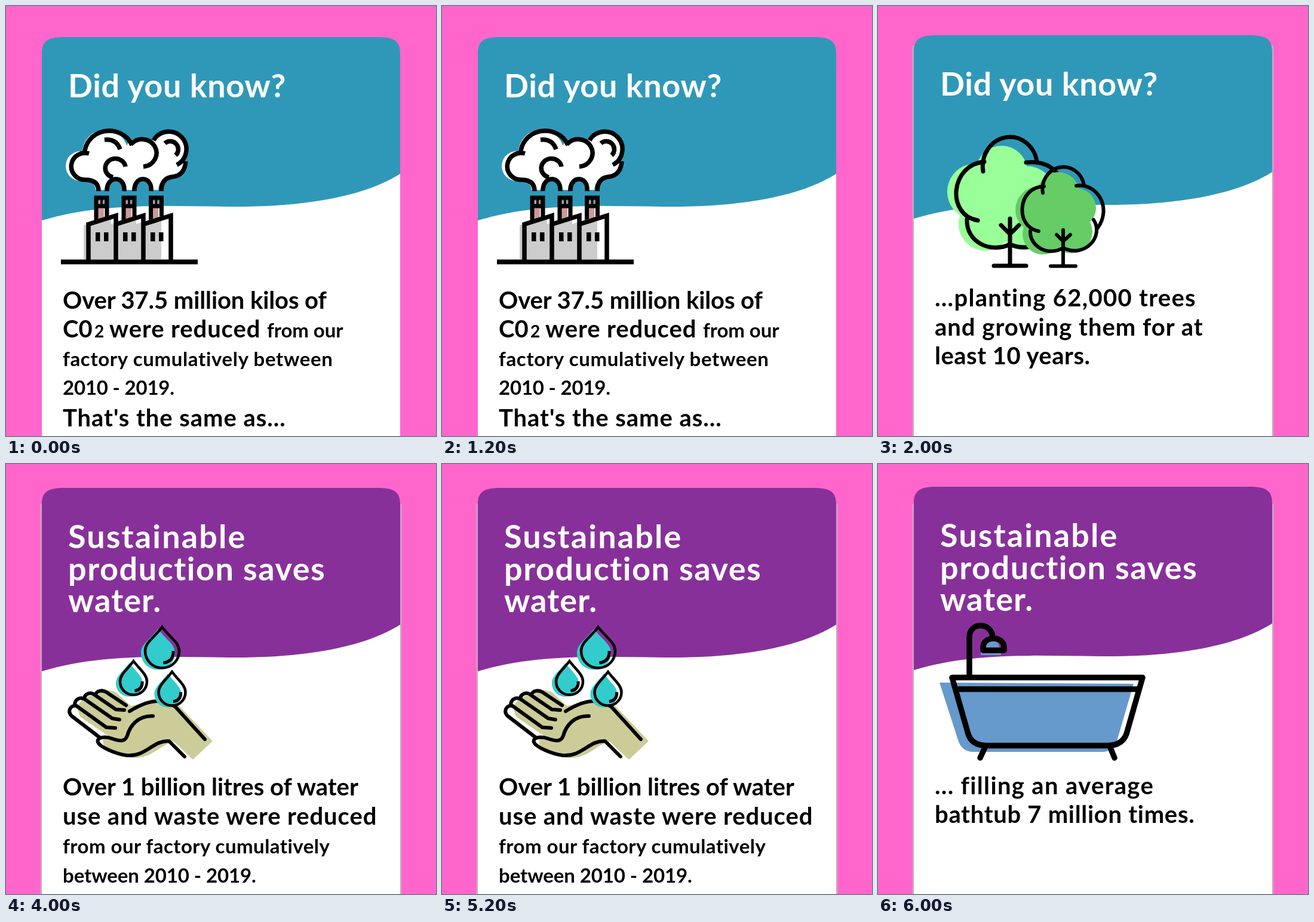
Recreate the animation shown at these times as an HTML page. Size 720x720 px, loop 8000 ms.

```html
<!DOCTYPE html>
<html lang="en">
<head>
<meta charset="utf-8">
<title>Did you know?</title>
<style>
html, body { margin: 0; width: 100%; height: 100%; overflow: hidden; background: #ff66cc; }
svg { display: block; width: 100vw; height: 100vh; }
text { font-family: Lato, "Open Sans", sans-serif; font-weight: 700; }
.line { fill: none; stroke: #000; }
.round { stroke-linecap: round; stroke-linejoin: round; }
</style>
</head>
<body>
<svg id="stage" viewBox="0 0 720 720" xmlns="http://www.w3.org/2000/svg"></svg>
<script>
const TEAL = "#2f98b8", PURPLE = "#88309a";
const SCENE_MS = 2000;

const fill = (d, color) => `<path d="${d}" fill="${color}"/>`;
const line = (d, width, cls = "") => `<path class="line ${cls}" d="${d}" stroke-width="${width}"/>`;
const disc = (x, y, r) => `<circle cx="${x}" cy="${y}" r="${r}"/>`;
const discs = (color, list) => `<g fill="${color}">${list.map(c => disc(...c)).join("")}</g>`;
const text = (x, y, size, gap, words, color = "#000") =>
  `<text x="${x}" y="${y}" font-size="${size}" letter-spacing="${gap}" fill="${color}">${words}</text>`;
const title = (y, gap, words) => text(104, y, 54, gap, words, "#fff");
const big = (y, gap, words, x = 95) => text(x, y, 40, gap, words);
const small = (y, gap, words, x = 95) => text(x, y, 33, gap, words);

function card(dy, color, edges) {
  const rim = edges ? '<rect x="57.5" y="66" width="605" height="660" rx="3" fill="#cfa3c0"/>' : "";
  const wave = "C160 329 260 335 372 336 C500 337 600 319 660 281";
  return rim + '<rect x="60" y="78" width="600" height="650" fill="#fff"/>' +
    `<g transform="translate(0 ${dy})">` +
    fill(`M60 359 ${wave} V80 C660 58 650 52 620 52 H100 C70 52 60 58 60 80Z`, color) + "</g>";
}

function factory() {
  const bays = [138, 184, 230];
  const smoke = discs("#fff", [[125, 268, 25], [166, 245, 38], [225, 246, 26], [270, 238, 30], [278, 267, 20]]) +
    fill("M122 250 H284 V284 Q256 286 255 308 H240 Q238 290 225 291 Q212 291 211 308 H196 Q194 290 183 290 Q168 290 165 308 H150 Q150 292 122 292Z", "#fff");
  const outline = line(
    "M139 247 A23 22.5 0 1 0 133 291 Q155 291 155 310" +
    "M132 250 A41 38 0 0 1 211 233 M165 224 Q185 222 191 240" +
    "M209 232 A24 23 0 1 1 230 269 M247 225 A29.5 29.5 0 1 1 286 266" +
    "M266 230 A13 13 0 1 1 284 250 M301 260 Q299 284 279 286 Q260 288 260 310" +
    "M200 269 A17 16 0 1 0 179 287" +
    "M169 310 C168 283 200 283 198 310 M215 310 C214 283 245 283 243 310", 7.5);
  const chimneys = [160, 206, 251.5].map(x =>
    `<rect x="${x - 12}" y="326" width="16" height="42" fill="#cc9999"/>` +
    line(`M${x - 9} 360 V321 H${x + 9} V354 M${x - 9} 335 H${x + 9}`, 7) +
    line(`M${x} 321 V334`, 4)).join("");
  const walls = fill("M130 424 V367 L176 353 V365 L218 352 V365 L260 352 V424Z", "#cccccc");
  const frames = line(bays.map(x => `M${x} 426 V365.5 L${x + 46} 351 V426`).join(""), 7.5);
  const panes = bays.map(x => `<path d="M${x + 12} 379h7.5v15h-7.5z m14 0h7.5v15h-7.5z"/>`).join("");
  return smoke + outline + chimneys + walls + frames + panes + line("M92 428.5 H321", 8);
}

function trees() {
  const back = discs("#99ff99", [[207, 277, 43], [163, 311, 47], [180, 365, 45], [249, 315, 47], [243, 371, 38], [210, 330, 50]]);
  const front = discs("#66cc66", [[302, 313, 35], [269, 341, 39], [276, 382, 34], [332, 338, 33], [323, 378, 36], [300, 350, 40]]);
  const backLines = line(
    "M176 277 A45.5 49 0 0 1 266 260 M248 262 Q282 259 299 279" +
    "M178 261 C122 265 113 349 167 359 M149 357 C147 395 188 415 221 399 Q236 406 256 403" +
    "M221 356 V435 M206 367 L221 382 L236 367 M194 435 H248", 7, "round");
  const frontLines = line(
    "M276 313 A35 37 0 0 1 345 300 M332 301 C367 296 393 338 367 373" +
    "M361 358 C379 386 346 423 310 405 M278 302 C233 303 229 370 269 377" +
    "M255 377 C254 403 285 420 310 405" +
    "M310 375 V435 M299 383 L310 394 L322 383 M289 435.5 H331", 6, "round");
  return back + backLines + front + frontLines;
}

function drop(x, tip, cy, r) {
  const k = r * 0.56, low = cy + r;
  const shape = `M${x} ${tip} C${x + r * 0.5} ${tip + r * 0.66} ${x + r} ${cy - r * 0.5} ${x + r} ${cy}` +
    `C${x + r} ${cy + k} ${x + k} ${low} ${x} ${low} S${x - r} ${cy + k} ${x - r} ${cy}` +
    `C${x - r} ${cy - r * 0.5} ${x - r * 0.5} ${tip + r * 0.66} ${x} ${tip}Z`;
  const glint = `M${x + r * 0.65} ${cy} Q${x + r * 0.68} ${cy + r * 0.62} ${x + 2} ${cy + r * 0.7}`;
  return `<g transform="translate(-7 3)">${fill(shape, "#33cccc")}</g>` + line(shape, 4.5) + line(glint, 5);
}

function hand() {
  const skin = fill("M119 408 C124 394 138 386 151 387 C157 376 173 377 184 382 L209 405" +
    "C234 400 264 389 290 405 L346 464 L313 495 L281 465 C258 470 246 491 218 492" +
    "C195 492 168 482 163 469 C161 461 166 456 172 456 L124 423Z", "#cccc99");
  const lines = line(
    "M157 458 L110 422 C102 414 108 403 118 405 L168 441 L183 442" +
    "M115 404 C115 394 124 389 132 394 L178 426 L190 428" +
    "M131 393 C132 384 142 381 149 387 L184 411 L198 412" +
    "M150 386 C152 379 162 378 168 382 L201 404" +
    "M207 414 C231 399 260 388 284 407 L333 461" +
    "M246 422 C222 421 208 437 203 455 C199 466 190 464 178 460" +
    "C165 455 151 458 154 466 C157 474 185 486 203 488 C235 490 247 462 273 464 L299 490", 6, "round");
  return skin + lines + drop(261.5, 273, 313, 28.5) + drop(213.5, 330, 364, 22.5) + drop(278, 348, 382, 22.5);
}

function bath() {
  const water = fill("M103 366 L428 368 L400 464 Q394 482 375 482 H160 Q140 482 134 462Z", "#6699cc") +
    fill("M172 314 H206 V320 H172Z M180 308 V302 Q191 291 201 300 L204 308Z", "#6699cc");
  return water + line(
    "M124 357.5 H443 L416 452 Q409 471 385 471.5 H181 Q157 471 151 452Z M131 377 H437" +
    "M179 475 L171 492 M389 475 L396 492 M153 356 V290 C153 264 190 264 192 290" +
    "M176 312 V307 C176 287 211 287 211 307 V312Z", 9.5, "round");
}

function waterTitle(y) {
  return title(y, 2.1, "Sustainable") + title(y + 53.5, 1.5, "production saves") + title(y + 107, 1.1, "water.");
}

const scenes = [
  card(0, TEAL, false) + title(153, 0.6, "Did you know?") + factory() +
    big(507, -0.1, "Over 37.5 million kilos of") +
    big(555, 0, "C0") + text(148, 555, 28, 0, "2") + big(555, 0.9, "were reduced", 173) +
    small(555, -0.1, "from our", 437) + small(603, 0.65, "factory cumulatively between") +
    small(651, -0.2, "2010 - 2019.") + big(704, 0.95, "That's the same as..."),
  card(-3, TEAL, true) + title(150, 0.6, "Did you know?") + trees() +
    big(503, 1.3, "...planting 62,000 trees") +
    big(552, 1, "and growing them for at") + big(600, 0.5, "least 10 years."),
  card(-12, PURPLE, true) + waterTitle(141) + hand() +
    big(555, 0, "Over 1 billion litres of water") +
    big(604, 0.9, "use and waste were reduced") +
    small(652, 0.45, "from our factory cumulatively") + small(701, -0.1, "between 2010 - 2019."),
  card(-14, PURPLE, true) + waterTitle(139) + bath() +
    big(553, 1.35, "... filling an average") + big(601, 0.7, "bathtub 7 million times.")
];

const stage = document.getElementById("stage");
stage.innerHTML = '<rect width="720" height="720" fill="#ff66cc"/>' +
  scenes.map(s => `<g class="scene">${s}</g>`).join("");
const groups = [...stage.querySelectorAll(".scene")];

function draw(ms) {
  const current = Math.floor(ms / SCENE_MS) % groups.length;
  groups.forEach((g, i) => g.setAttribute("display", i === current ? "inline" : "none"));
}

const start = performance.now();
function tick() {
  draw(performance.now() - start);
  requestAnimationFrame(tick);
}
draw(0);
requestAnimationFrame(tick);
</script>
</body>
</html>
```
